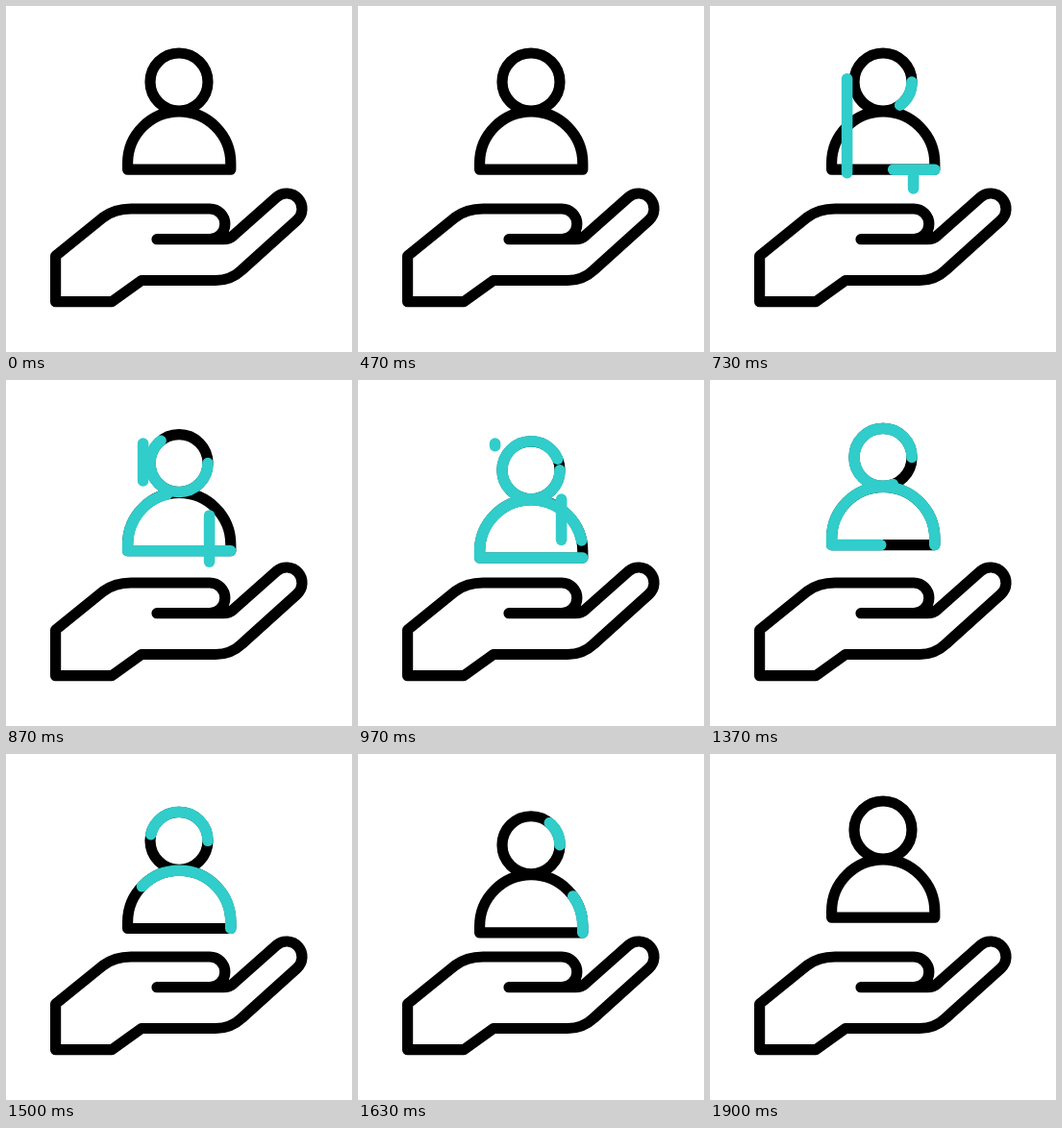
An HTML page for the animation above (2.5 s loop, 360 by 360 pixels).

```html
<!DOCTYPE html>
<html lang="en">
<head>
<meta charset="utf-8">
<title>Hand holding a person</title>
<style>
  html, body { margin: 0; width: 100%; height: 100%; overflow: hidden; background: #fff; }
  svg { display: block; width: 100vw; height: 100vh; }
  path { fill: none; stroke: #000; stroke-width: 11.2; stroke-linecap: round; stroke-linejoin: round; }
  .accent { stroke: #30cdcb; stroke-width: 11.6; }
</style>
</head>
<body>
<svg viewBox="0 0 360 360">
  <path d="M157 242.7H212A15.8 15.8 0 0 0 212 211H130Q113 211 101 220L51.6 260V307.7H110L141 285.5H218Q234 285.5 245 275L302.6 223A16 16 0 0 0 281.4 199L238 237.5Q233 242.7 226 242.7H205"/>
  <g id="person">
    <path d="M210 79A30 30 0 1 1 150 79A30 30 0 1 1 210 79Z"/>
    <path d="M233.8 170.2H126.6V163.5A53.6 53.6 0 0 1 233.8 163.5Z"/>
  </g>
  <path id="left" class="accent"/>
  <path id="right" class="accent"/>
</svg>
<script>
const LOOP = 2500;
const BOB = { from: 730, period: 585, cycles: 2, depth: 16 };
const byId = id => document.getElementById(id);
const person = byId('person');

// Coloured copies sit on top of the black outlines.
const accents = [...person.querySelectorAll('path')].map(path => {
  const copy = path.cloneNode();
  copy.setAttribute('class', 'accent');
  copy.setAttribute('pathLength', 1);
  return person.appendChild(copy);
});

const ease = (t, from, to) => {
  const u = Math.min(1, Math.max(0, (t - from) / (to - from)));
  return u * u * (3 - 2 * u);
};

function show(el, visible) {
  el.style.display = visible ? '' : 'none';
}

function trim(el, start, end) {
  show(el, end - start > 0.001);
  const full = start === 0 && end === 1;
  el.style.strokeDasharray = full ? 'none' : `${end - start} 2`;
  el.style.strokeDashoffset = -start;
}

function streak(el, x, bottom, top, head, tail) {
  const y = k => bottom + (top - bottom) * k;
  show(el, head - tail > 0.001);
  el.setAttribute('d', `M${x} ${y(tail)}V${y(head)}`);
}

function bob(t) {
  const turn = (t - BOB.from) / BOB.period;
  if (turn < 0 || turn > BOB.cycles) return 0;
  return BOB.depth / 2 * (1 - Math.cos(2 * Math.PI * turn));
}

function draw(t) {
  person.setAttribute('transform', `translate(0 ${bob(t)})`);
  const drawn = ease(t, 634, 1032);
  const erased = ease(t, 1219, 1757);
  accents.forEach(el => trim(el, erased, drawn));
  streak(byId('left'), 142.6, 190, 66, ease(t, 470, 785), ease(t, 651, 1002));
  streak(byId('right'), 211.6, 190, 120, ease(t, 574, 1040), ease(t, 850, 1160));
}

const origin = performance.now();
function tick() {
  draw((performance.now() - origin) % LOOP);
  requestAnimationFrame(tick);
}
tick();
</script>
</body>
</html>
```
